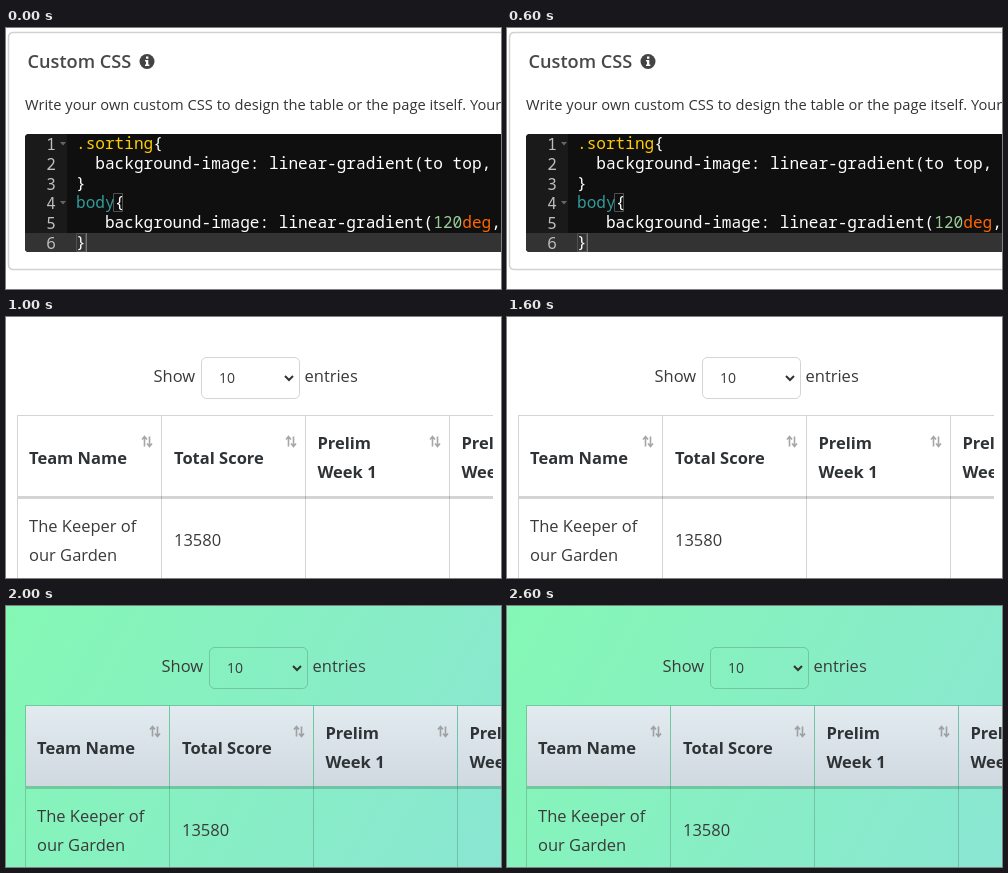
Animation of 495 by 261 pixels, one loop 3 s. Source, as an HTML page:

```html
<!DOCTYPE html>
<html lang="en">
<head>
<meta charset="utf-8">
<title>Custom table styling</title>
<style>
  html, body { margin: 0; width: 100%; height: 100%; overflow: hidden; background: #fff; }
  svg { display: block; width: 495px; height: 261px; }
  text { font-family: "Open Sans", "Noto Sans", sans-serif; white-space: pre; }
  .code text { font: 500 16.1px "Noto Sans Mono", "DejaVu Sans Mono", monospace; fill: #fff; }
  .code .num { font-weight: 400; fill: #bebebe; text-anchor: end; }
  .table text { font-size: 16.5px; fill: #3a3a3a; }
  .table .head text { font-weight: 700; fill: #2f3336; }
  .lines { fill: none; stroke: #000; stroke-opacity: .17; }
  .scene { visibility: hidden; }
</style>
</head>
<body>
<svg viewBox="0 0 495 261">
  <defs>
    <linearGradient id="page" gradientUnits="userSpaceOnUse" x1="-64" y1="-49" x2="1019" y2="576">
      <stop stop-color="#84fab0"/><stop offset="1" stop-color="#8fd3f4"/>
    </linearGradient>
    <linearGradient id="header" x2="0" y2="1">
      <stop stop-color="#e2ebf0"/><stop offset="1" stop-color="#cfd9df"/>
    </linearGradient>
    <clipPath id="crop"><path d="M0 0H487V261H0z"/></clipPath>
    <g id="sort" fill="none" stroke="#8a8a8a" stroke-opacity=".75" stroke-width="1.6">
      <path d="M-2.5 5V-5M-5 -2L-2.5 -5L0 -2M2.5 -5V5M0 2L2.5 5L5 2"/>
    </g>
    <g id="table" class="table" clip-path="url(#crop)">
      <text x="147.500" y="65">Show</text>
      <text x="298.500" y="65">entries</text>
      <text x="213" y="66" style="font-size:14px">10</text>
      <path d="M279 59l4 4l4-4" fill="none" stroke="#333" stroke-width="2"/>
      <g class="lines">
        <rect x="195.500" y="40.500" width="98" height="41" rx="5"/>
        <path d="M11.500 261V98.500H495M155.500 99V261M299.500 99V261M443.500 99V261"/>
        <path d="M12 180.500H495" stroke-width="3"/>
      </g>
      <g class="head">
        <text x="23" y="147">Team Name</text>
        <text x="168" y="147">Total Score</text>
        <text x="311.500" y="132">Prelim</text>
        <text x="311.500" y="161">Week 1</text>
        <text x="455.500" y="132">Prelim</text>
        <text x="455.500" y="161">Week 2</text>
      </g>
      <use href="#sort" x="141" y="124.500"/>
      <use href="#sort" x="285" y="124.500"/>
      <use href="#sort" x="429" y="124.500"/>
      <text x="23" y="215">The Keeper of</text>
      <text x="23" y="244">our Garden</text>
      <text x="168" y="229">13580</text>
    </g>
  </defs>

  <g class="scene">
    <path d="M500 4.500H7.500Q2.500 4.500 2.500 9.500V236.500Q2.500 241.500 7.500 241.500H500" fill="none" stroke="#d2d2d2" stroke-width="1.5"/>
    <text x="21.500" y="40" font-size="18.2" font-weight="600" fill="#484848">Custom CSS</text>
    <circle cx="141" cy="33.500" r="7.500" fill="#444"/>
    <path d="M140 28.500h2.400v2.300h-2.400zM139 32h3.300v4.500h1v1.500h-4.300v-1.500h1v-3h-1z" fill="#fff"/>
    <text x="19" y="82" font-size="14.66" fill="#333">Write your own custom CSS to design the table or the page itself. Your</text>
    <g class="code" id="editor">
      <path d="M495 106H23Q19 106 19 110V220Q19 224 23 224H495z" fill="#0f0f0f"/>
      <path d="M61 106H23Q19 106 19 110V220Q19 224 23 224H61z" fill="#1a1a1a"/>
      <path d="M19 205H495V224H23Q19 224 19 220z" fill="#333"/>
      <path d="M107.500 165.500h9v18h-9zM70.500 205.500h9v18h-9z" fill="none" stroke="#505050"/>
      <path d="M80.500 205V224" stroke="#777"/>
      <path d="M54 114h6l-3 3.500zM54 173h6l-3 3.500z" fill="#666"/>
    </g>
  </g>

  <g class="scene"><use href="#table"/></g>

  <g class="scene">
    <path d="M0 0H495V261H0z" fill="url(#page)"/>
    <path d="M20 100h143v80h-143zM164 100h143v80h-143zM308 100h143v80h-143zM452 100h43v80h-43z" fill="url(#header)"/>
    <use href="#table" x="8" y="1"/>
  </g>
</svg>
<script>
  const editor = document.getElementById("editor");
  const scenes = document.querySelectorAll(".scene");

  // Each line is a list of [text, colour] runs.
  const lines = [
    [[".sorting", "#fc0"], ["{"]],
    [["  background-image: linear-gradient(to top, "]],
    [["}"]],
    [["body", "#399"], ["{"]],
    [["   background-image: linear-gradient("], ["120", "#9c9"], ["deg", "#f60"], [","]],
    [["}"]]
  ];

  function addText(x, y, runs, className = "") {
    const ns = "http://www.w3.org/2000/svg";
    const text = document.createElementNS(ns, "text");
    text.setAttribute("x", x);
    text.setAttribute("y", y);
    text.setAttribute("class", className);
    for (const [content, colour = ""] of runs) {
      const run = document.createElementNS(ns, "tspan");
      run.textContent = content;
      run.style.fill = colour;
      text.append(run);
    }
    editor.append(text);
  }

  lines.forEach((runs, i) => {
    const y = 121 + i * 19.8;
    addText(50, y + 1, [[i + 1]], "num");
    addText(70, y, runs);
  });

  function draw() {
    const current = Math.floor(performance.now() % 3000 / 1000);
    scenes.forEach((scene, i) => {
      scene.style.visibility = i === current ? "visible" : "hidden";
    });
    requestAnimationFrame(draw);
  }
  draw();
</script>
</body>
</html>
```
